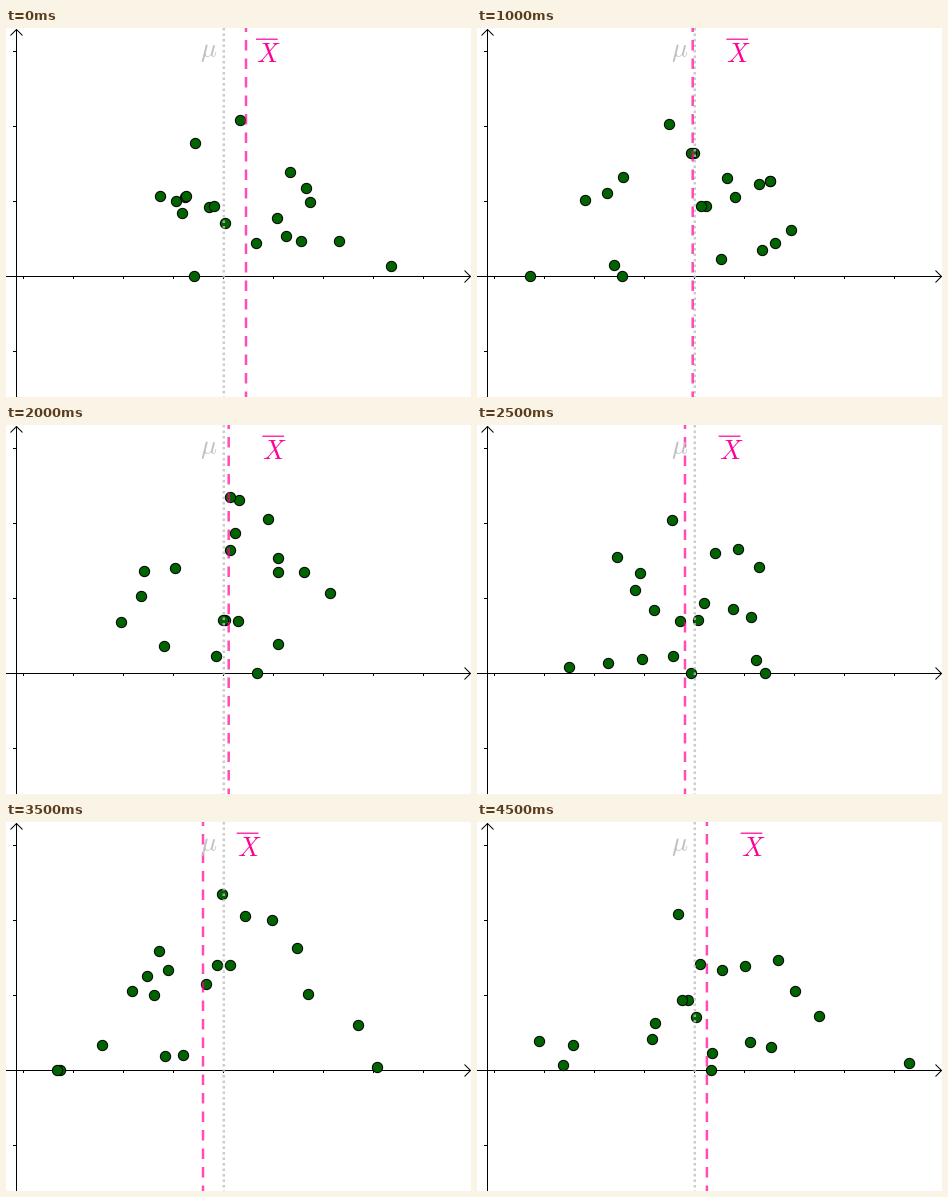
A matplotlib script that plays this animation: 465x369 px, repeating every 5000 ms.

```python
import numpy as np
import matplotlib.pyplot as plt
from matplotlib.animation import FuncAnimation

W, H, DPI = 465, 369, 100
PX = 72 / DPI                      # one pixel in points
MU, SIGMA, PEAK, BASE = 217.6, 85, 176.8, 248.3
PINK, GRAY, GREEN = "#ff0099", "#c0c0c0", "#006400"

# Sample mean shown at each step
MEANS = [240, 226, 215.7, 212, 222.7, 208, 221, 197, 210.3, 229.9]


def draw_sample(i):
    """Twenty normal draws, each at a random tenth of the bell curve's height."""
    rng = np.random.default_rng(40 + i)
    x = rng.normal(0, SIGMA, 20)
    x += MEANS[i] - x.mean()
    bell = PEAK * np.exp(-((x - MU) / SIGMA) ** 2 / 2)
    return x, BASE - bell * rng.integers(0, 11, 20) / 10


fig = plt.figure(figsize=(W / DPI, H / DPI), dpi=DPI, facecolor="white")
ax = fig.add_axes([0, 0, 1, 1])
ax.set_xlim(0, W)
ax.set_ylim(H, 0)
ax.axis("off")


def stroke(xs, ys, color="black", width=1.0, **kw):
    return ax.plot(xs, ys, color=color, lw=width * PX, snap=False,
                   solid_capstyle="butt", dash_capstyle="butt", **kw)[0]


def label(x, y, text, color):
    return ax.text(x, y, text, color=color, fontsize=26.5 * PX, ha="left",
                   va="baseline", math_fontfamily="cm", zorder=5)


# Axes with open arrow heads and small ticks
stroke([0, W], [248.5, 248.5])
stroke([10.5, 10.5], [1, H])
stroke([458.5, 464.5, 458.5], [242.5, 248.5, 254.5])
stroke([4.5, 10.5, 16.5], [7.5, 1.5, 7.5])
for tx in range(17, W - 25, 50):
    stroke([tx + 0.5] * 2, [248, 251])
for ty in range(23, H, 75):
    stroke([7, 11], [ty + 0.5] * 2)

dots = ax.scatter([], [], s=(10.3 * PX) ** 2, c=GREEN, edgecolors="black",
                  linewidths=PX, zorder=3, snap=False)
stroke([217.8, 217.8], [0, H], GRAY, 2.5, alpha=0.8, zorder=4,
       linestyle=(0, (1, 1.2)))
label(194, 29.5, r"$\mu$", GRAY)

mean_line = stroke([0, 0], [0, H], PINK, 2.5, alpha=0.7, zorder=4,
                   linestyle=(2.6, (4.2, 3.2)))
bar = stroke([0, 0], [11.2, 11.2], PINK, 1.2, zorder=5)
x_label = label(0, 34.3, r"$X$", PINK)


def update(i):
    x, y = draw_sample(i)
    mean = MEANS[i]
    left = mean + (10 if i == 0 else 33.7)   # the label sits closer at the start
    dots.set_offsets(np.column_stack([x, y]))
    mean_line.set_xdata([mean, mean])
    bar.set_xdata([left, left + 21.7])
    x_label.set_x(left)
    return dots, mean_line, bar, x_label


anim = FuncAnimation(fig, update, frames=len(MEANS), interval=500, repeat=True,
                     repeat_delay=0, blit=False)
plt.show()
```
